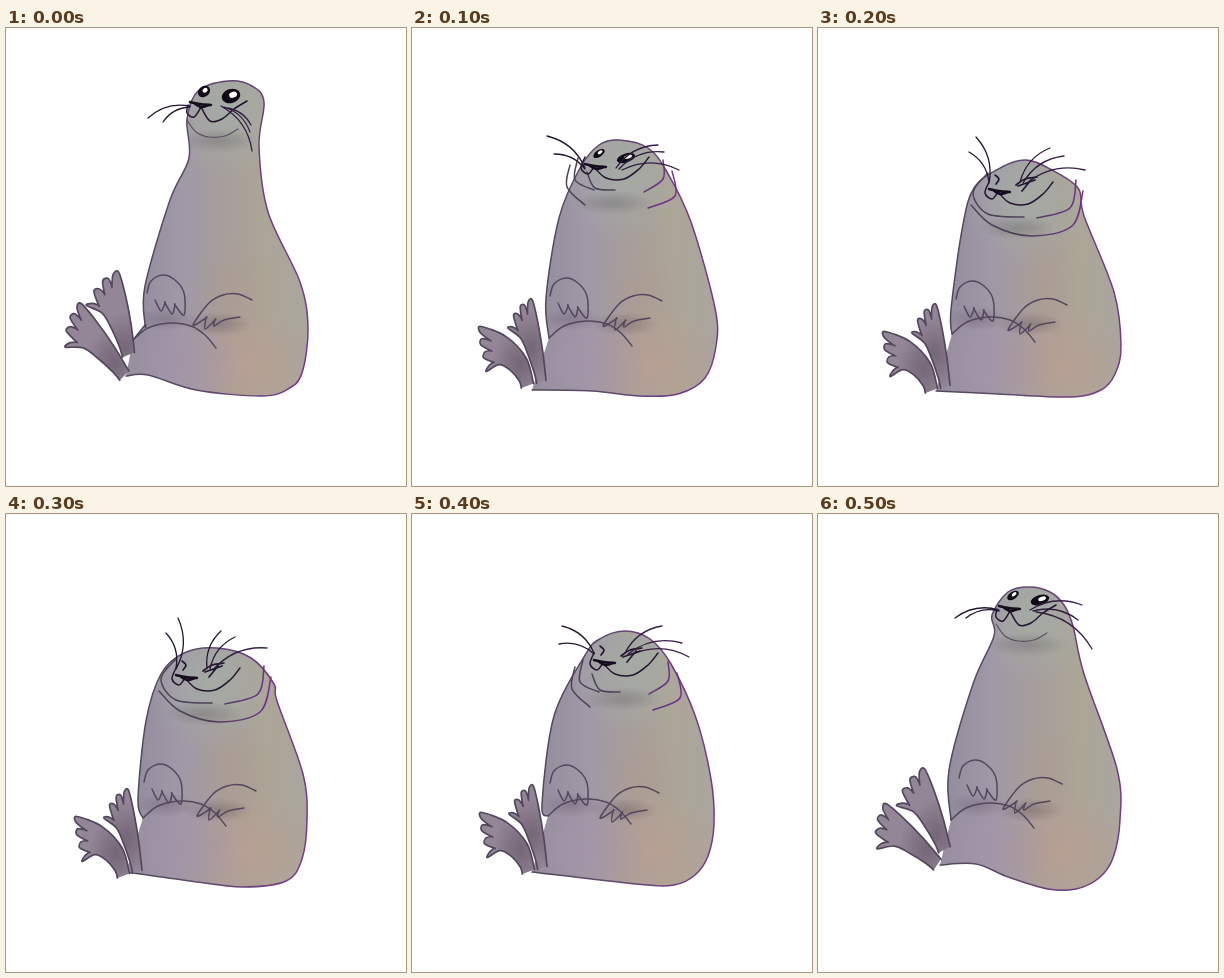
Write an HTML page with a canvas that moves like this. It is 400 by 458 pixels and loops after 600 ms.

```html
<!DOCTYPE html>
<html>
<head>
<meta charset="utf-8">
<style>
html, body { margin: 0; height: 100%; overflow: hidden; background: #fff }
canvas { display: block }
</style>
</head>
<body>
<canvas id="stage" width="400" height="458"></canvas>
<script>
const ctx = document.getElementById('stage').getContext('2d');
const parse = text => text.trim().split(/\s+/).map(w => w.split(',').map(Number));

// Smooth path through points; a repeated point makes a corner.
function smooth(p, path = new Path2D()) {
  path.moveTo(...p[0]);
  for (let i = 0; i < p.length - 1; i++) {
    const a = p[i - 1] || p[i], b = p[i], c = p[i + 1], d = p[i + 2] || c;
    path.bezierCurveTo(b[0] + (c[0] - a[0]) / 6, b[1] + (c[1] - a[1]) / 6,
      c[0] - (d[0] - b[0]) / 6, c[1] - (d[1] - b[1]) / 6, c[0], c[1]);
  }
  return path;
}

function curve(text) {
  const path = new Path2D();
  text.split(';').forEach(part => smooth(parse(part), path));
  return path;
}

function linear(x0, x1, ...colors) {
  const g = ctx.createLinearGradient(x0, 0, x1, 0);
  colors.forEach((c, i) => g.addColorStop(i / (colors.length - 1), c));
  return g;
}

function at(x, y, draw) {
  ctx.save();
  ctx.translate(x, y);
  draw();
  ctx.restore();
}

function glow(x, y, rx, ry, rgb, alpha) {
  at(x, y, () => {
    ctx.scale(rx, ry);
    const g = ctx.createRadialGradient(0, 0, 0, 0, 0, 1);
    g.addColorStop(0, `rgba(${rgb},${alpha})`);
    g.addColorStop(.5, `rgba(${rgb},${alpha * .55})`);
    g.addColorStop(1, `rgba(${rgb},0)`);
    ctx.fillStyle = g;
    ctx.fillRect(-1, -1, 2, 2);
  });
}

function stroke(path, color, width = 1.5) {
  ctx.strokeStyle = color;
  ctx.lineWidth = width;
  ctx.stroke(path);
}

const ink = '#241630';
const limb = '#54475d';
const skin = linear(130, 304, '#948d9d', '#a098a7', '#a69e9c', '#aca697', '#aaa59f');
const edge = linear(130, 290, '#51495c', '#5d4b69', '#69417b', '#733a8c');
const foldInk = linear(150, 265, '#4c4356', '#4d4056', '#742d91');

// Parts shared by the poses. Face parts are placed relative to the nose.
const nose = curve('-11,-2 -1,0 10,1; -7,-1 0,3 8,1');
const thigh = curve('0,0 15,-12 38,-17 58,-14 72,-5 83,8');
const leftPaw = curve('138,268 142,256 154,250 166,255 175,268 175,290 166,280 166,280 163,289 156,278 156,278 152,286 146,275');
const rightPaw = curve('250,273 236,267 221,268 207,276 191,298 204,291 204,291 203,302 213,293 213,293 212,299 222,293 238,290');
const grin = curve('-2,1 -8,8 -15,2 -11,-9; -2,1 10,12 28,13 43,3 53,-9');
const smile = curve('0,3 -7,13 -14,9 -13,1; 0,3 9,17 21,15 33,5 46,-3');
const squint = curve('16,-6 25,-12 37,-14; 18,-5 35,-11; 22,0 31,-11; -5,-16 -1,-12 -4,-7');
const chin = curve('-14,16 -5,28 8,33 24,32 37,25');
const sideFolds = curve('163,153 160,175 178,193; 171,146 168,168 187,178; 180,160 188,176 208,178; 256,148 256,167 237,180; 265,159 268,184 241,196');
const jowls = curve('170,145 155,165 170,186 206,189; 153,177 174,197 213,208 254,198 265,163; 219,190 252,180 258,152');

const sitting = { feet: [[115, 358, 20, 65, 64, 1], [129, 354, 17, 0, 83, .75]], mouth: grin };
const doze = { ...sitting, squint: true, folds: jowls, foldShift: [0, 0] };

// Feet: ankle x, y, heading and bend in degrees, length, width.
const poses = [
  {
    body: '127,312 139,297 139,297 139,258 164,172 183,130 181,91 192,63 222,53 246,58 258,74 253,118 262,184 294,254 302,300 296,345 282,361 256,368 190,362 142,347 120,348',
    nose: [195, 76], open: 7, mouth: smile,
    tips: ['142,90 157,94', '246,123 244,104 245,97'],
    feet: [[118, 348, 45, 0, 84, 1], [122, 327, 21, 0, 83, 1]],
    footShift: [0, 0], paws: [3, -3, -4, -1]
  },
  {
    ...sitting,
    body: '137,310 134,270 147,190 168,140 187,117 207,112 236,120 255,144 279,194 303,280 304,318 293,350 266,366 228,368 180,363 120,362',
    nose: [184, 138], open: 4.5, folds: sideFolds, foldShift: [-5, -16],
    tips: ['135,108 142,126', '246,117 252,124 267,142'],
    footShift: [0, 0], paws: [0, 0, 0, 0]
  },
  {
    ...doze,
    body: '134,306 133,282 144,202 156,160 184,139 208,132 232,141 260,160 266,188 296,264 303,318 297,346 283,362 252,369 180,366 118,363',
    nose: [182, 163],
    tips: ['151,124 158,109', '232,120 246,128 267,142'],
    footShift: [-2, 5], paws: [0, 3, -1, 4]
  },
  {
    ...doze,
    body: '137,304 132,285 140,207 155,160 178,139 211,134 245,144 268,170 271,187 297,260 301,305 296,345 280,367 236,373 184,367 120,358',
    nose: [181, 163],
    tips: ['160,119 172,104', '215,117 229,123 261,134'],
    footShift: [2, 4], paws: [0, 0, 0, 4]
  },
  {
    ...doze,
    body: '136,302 130,290 142,202 172,143 186,126 212,117 238,125 259,150 284,204 299,265 302,310 296,342 283,361 262,371 224,370 120,358',
    nose: [193, 148], folds: sideFolds,
    tips: ['150,112 147,130', '250,112 270,129 277,143'],
    footShift: [1, 0], paws: [0, 1, -3, 6]
  },
  {
    body: '133,306 131,256 155,170 176,122 174,101 190,78 211,73 232,78 246,91 255,112 266,160 299,255 302,306 295,344 281,364 258,375 230,375 190,363 158,350 122,351',
    nose: [192, 94], open: 5, mouth: smile,
    tips: ['137,104 148,104', '264,91 260,106 274,135'],
    feet: [[119, 351, 55, 0, 79, 1], [126, 336, 28, 0, 83, 1]],
    footShift: [0, 0], paws: [3, -4, -6, -3]
  }
];

// Outline of a flipper: front edge, four toes, back edge.
function footPath([x, y, heading, bend, length, wide]) {
  const rad = Math.PI / 180;
  const place = (t, w) => {
    const mid = (heading + bend * t / 2) * rad, end = (heading + bend * t) * rad;
    return [x - length * t * Math.sin(mid) + w * wide * Math.cos(end),
      y - length * t * Math.cos(mid) - w * wide * Math.sin(end)];
  };
  const points = [place(0, 7), place(.34, 14), place(.68, 19)];
  for (let i = 0; i < 4; i++) {
    const reach = k => 1 - .026 * k * k, w = 18 - 12 * i;
    points.push(place(reach(i) - .03, w + 3), place(reach(i) - .03, w - 3));
    const notch = place(reach(i + .5) - .15, (w - 6) * .8);
    if (i < 3) points.push(notch, notch);
  }
  points.push(place(.58, -9), place(.37, -6), place(.13, -5), place(0, -6));
  return smooth(points);
}

function whiskerPath({ nose: [x, y], tips, squint }) {
  const path = new Path2D();
  tips.forEach((group, right) => parse(group).forEach(([tx, ty], i) => {
    const x0 = x + (right ? 20 + 3 * i : -11), y0 = y + (squint ? -9 : 2) + i;
    const dx = tx - x0, dy = ty - y0, bow = right ? .25 : -.25;
    path.moveTo(x0, y0);
    path.quadraticCurveTo(x0 + dx / 2 + dy * bow, y0 + dy / 2 - dx * bow, tx, ty);
  }));
  return path;
}

for (const pose of poses) {
  const points = parse(pose.body);
  pose.hip = points[0];
  pose.shape = smooth(points);
  pose.flippers = pose.feet.map(footPath);
  pose.whiskers = whiskerPath(pose);
}

function drawBody({ shape, nose: [x, y] }) {
  ctx.fillStyle = skin;
  ctx.fill(shape);
  ctx.save();
  ctx.clip(shape);
  glow(x + 25, y + 4, 62, 70, '164,173,166', .85);
  glow(230, 270, 40, 70, '176,153,140', .5);
  glow(240, 338, 70, 60, '186,158,146', .8);
  glow(170, 335, 65, 50, '163,147,168', .75);
  glow(x + 17, y + 37, 40, 12, '78,72,78', .28);
  glow(160, 291, 30, 12, '88,72,92', .3);
  glow(212, 296, 34, 12, '88,76,84', .35);
  ctx.restore();
  stroke(shape, edge);
}

function drawFlipper(path, i) {
  ctx.fillStyle = '#938797';
  ctx.fill(path);
  ctx.save();
  ctx.clip(path);
  glow(108 + 11 * i, 335 - 15 * i, 28, 36, '88,70,88', .5);
  ctx.restore();
  stroke(path, limb, 1.7);
}

function drawEye(x, y, rx, ry, tilt) {
  at(x, y, () => {
    ctx.rotate(tilt);
    for (const [color, dx, k] of [['#100a16', 0, 1], ['#fff', rx * .25, .42]]) {
      ctx.fillStyle = color;
      ctx.beginPath();
      ctx.ellipse(dx, -dx / 4, rx * k, ry * k, 0, 0, 7);
      ctx.fill();
    }
  });
}

function drawFace(pose) {
  at(...pose.nose, () => {
    if (!pose.folds) stroke(chin, '#5a5060', 1.2);
    stroke(pose.mouth, ink);
    stroke(nose, '#160c1e', 2.5);
    if (pose.squint) stroke(squint, ink, 1.7);
    else {
      drawEye(30, -8, 9.5, pose.open, -.3);
      drawEye(3, -12.5, 6.5, pose.open * .75, -.6);
    }
  });
  stroke(pose.whiskers, linear(200, 260, ink, '#3c2050'), 1.3);
}

function draw() {
  const pose = poses[Math.floor(performance.now() % 600 / 100)];
  const [lx, ly, rx, ry] = pose.paws;
  ctx.fillStyle = '#fff';
  ctx.fillRect(0, 0, 400, 458);
  ctx.lineCap = ctx.lineJoin = 'round';
  drawBody(pose);
  at(...pose.footShift, () => pose.flippers.forEach(drawFlipper));
  at(...pose.hip, () => stroke(thigh, limb));
  at(lx, ly, () => stroke(leftPaw, limb));
  at(rx, ry, () => stroke(rightPaw, limb));
  if (pose.folds) at(...pose.foldShift, () => stroke(pose.folds, foldInk));
  drawFace(pose);
  requestAnimationFrame(draw);
}
draw();
</script>
</body>
</html>
```
